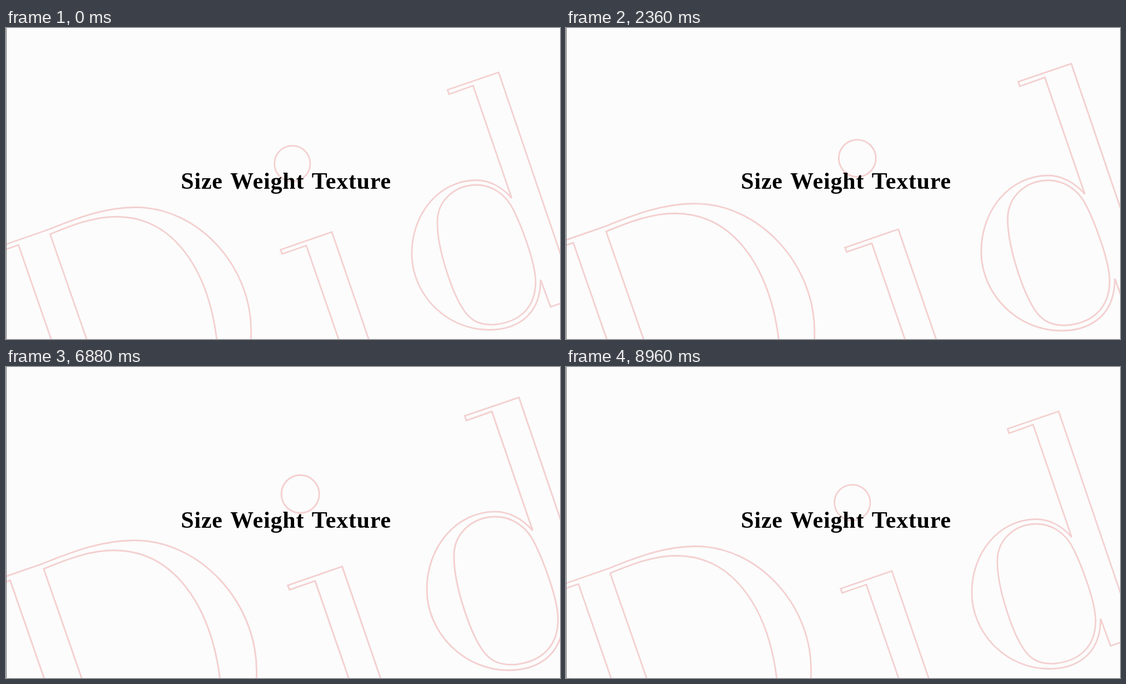
These frames come from a looping animation (998x561 px, 9000 ms). An HTML page:

```html
<!DOCTYPE html>
<html lang="en">
<head>
<meta charset="utf-8">
<title>Size Weight Texture</title>
<style>
  html, body { margin: 0; width: 100%; height: 100%; overflow: hidden; background: #fcfcfc; }
  svg { display: block; width: 100vw; height: 100vh; }
  #letters { fill: none; stroke: #f4d0d0; stroke-width: 2.8; }
  text {
    font: bold 42px "Liberation Serif", "Noto Serif", serif;
    letter-spacing: .8px;
    word-spacing: 3px;
  }
</style>
</head>
<body>
<svg viewBox="0 0 998 561">
  <g id="letters">
    <!-- D -->
    <path d="M-60 411 L78 363 C130 342 180 323 235 323.5 C345 324 441 428 441.5 545
             C442 575 437 610 425 650 L112 650 L22.5 391.5 L-57 419 Z"/>
    <path d="M79.5 372 C120 355 160 340 200 340.5 C302 341 364 436 379.5 561 L390 650 L176 650 Z"/>
    <!-- i -->
    <path d="M494.5 400 L587 368 L701 700 L647 700 L541 392.5 L497.5 407.5 Z"/>
    <circle cx="515.8" cy="244.6" r="32.2"/>
    <!-- d -->
    <path d="M795.5 111.5 L887.5 80 L1018 464 L1060 476 L1074 471 L981 503 L963 454
             C963 525 912 544.5 870 544.5 C793 544.5 731 480 731 407
             C731 335 780 275 847 274.5 C870 274.5 893 286 911 307 L841.5 104 L798 119.5 Z"/>
    <path d="M848 283 C810 283 777 310 777 350 C777 400 804 478 824 508
             C838 530 856 536 880 535 C930 530 954 500 954 458
             C954 420 925 350 915 330 C900 297 872 283 848 283 Z"/>
  </g>
  <rect width="1" height="561" fill="#6a6a6a"/>
  <text x="315" y="290">Size Weight Texture</text>
</svg>
<script>
  const LOOP = 9000, FRAME = 40;
  const PIVOT = { x: 274.5, y: 503 };
  const GROWTH = 0.08;
  const letters = document.getElementById('letters');

  const span = (t, start, end) => Math.min(1, Math.max(0, (t - start) / (end - start)));
  const accelerate = u => u ** 2.1;
  // Linear motion softened a little at both ends.
  const soften = u => u + 0.37 * (u * u * (3 - 2 * u) - u);

  function zoomAt(t) {
    const grow = accelerate(span(t, 1180, 2880));
    const shrink = soften(span(t, 6040, 8960));
    return 1 + GROWTH * (grow - shrink);
  }

  function draw(now) {
    const t = Math.floor((now % LOOP) / FRAME) * FRAME;
    const { x, y } = PIVOT;
    letters.setAttribute('transform',
      `translate(${x} ${y}) scale(${zoomAt(t)}) translate(${-x} ${-y})`);
    requestAnimationFrame(draw);
  }

  draw(0);
</script>
</body>
</html>
```
